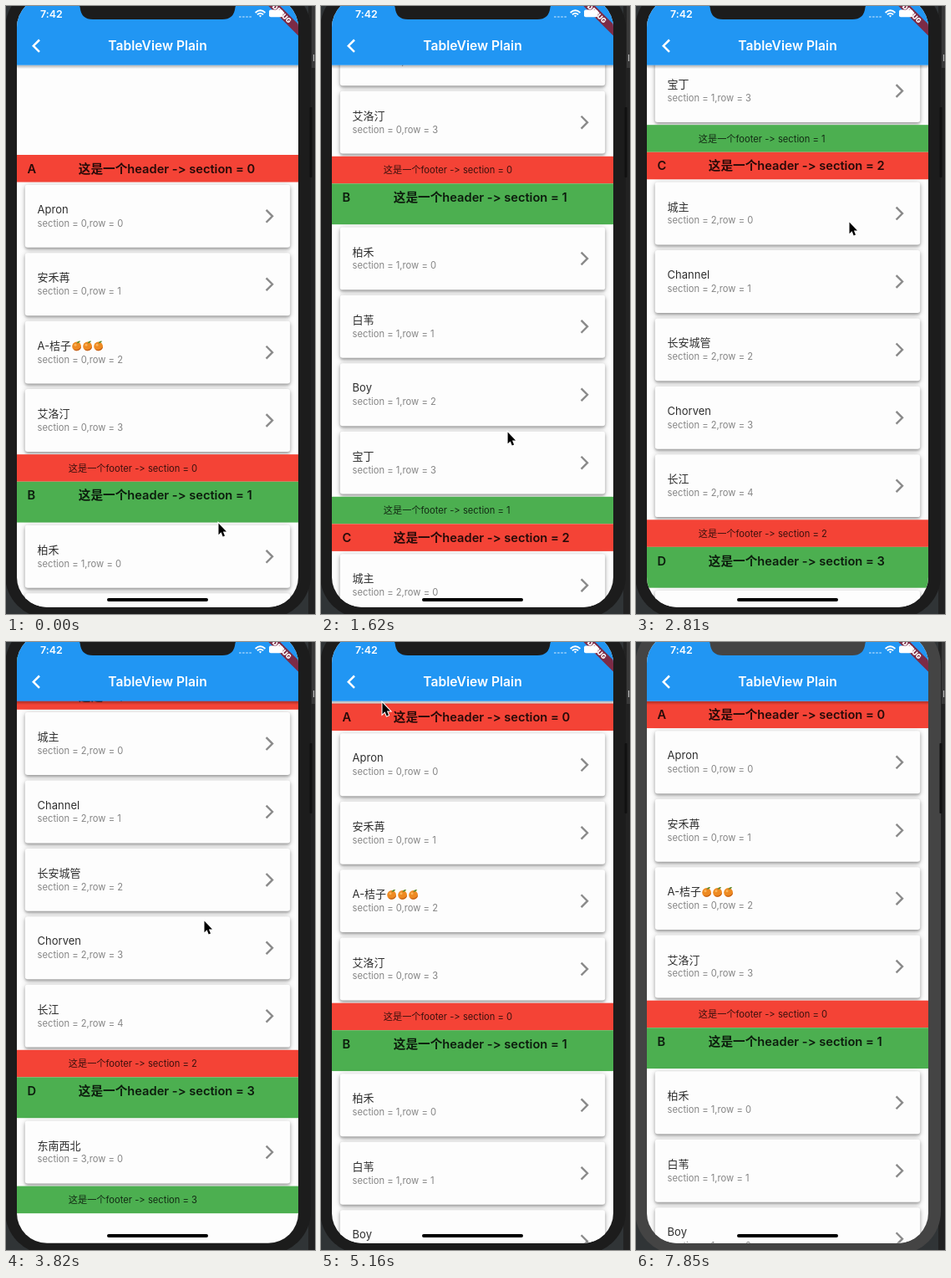
These frames come from a looping animation (370x727 px, 7.95 s). An HTML page:

```html
<!DOCTYPE html>
<html lang="zh">
<head>
<meta charset="utf-8">
<title>TableView Plain</title>
<style>
  html, body { margin: 0; width: 100%; height: 100%; overflow: hidden; background: #1a1a1a; }
  svg {
    display: block; width: 370px; height: 727px;
    font-family: Inter, "Noto Sans CJK SC", "Noto Sans CJK", sans-serif;
    font-variant-ligatures: none; font-feature-settings: "calt" 0;
  }
  text { white-space: pre; }
  .card { fill: #fdfdfd; filter: drop-shadow(0 2px 1.5px rgba(0,0,0,.26)) drop-shadow(0 1px 3px rgba(0,0,0,.24)); }
  .name { font-size: 13px; fill: #2e2e2e; }
  .sub { font-size: 11.2px; fill: #858585; }
  .head { font-size: 14.65px; font-weight: 600; fill: rgba(0,0,0,.84); }
  .foot { font-size: 11.2px; fill: rgba(0,0,0,.76); }
  .arrow { fill: none; stroke: #8a8a8a; stroke-width: 2.4; }
  .bar { fill: #fff; font-weight: 600; }
</style>
</head>
<body>
<svg viewBox="0 0 370 727">
  <defs>
    <clipPath id="screen"><rect x="13" y="-10.5" width="337" height="729.3" rx="36"/></clipPath>
    <linearGradient id="shade" x2="0" y2="1">
      <stop stop-opacity=".3"/><stop offset="1" stop-opacity="0"/>
    </linearGradient>
    <g id="orange">
      <circle r="5.4" cy=".6" fill="#ee8a22"/>
      <path d="M-4 4A5.4 5.4 0 0 0 5.4 .6A7 7 0 0 1-4 4" fill="#c05c18"/>
      <circle cx="-1.6" cy="-1" r="1.5" fill="#f9b45a"/>
      <path d="M0-3.2Q1-6.6 4.6-5.6Q3.4-2.8 0-3.2" fill="#5f8a2c"/>
    </g>
  </defs>

  <rect width="370" height="727" fill="#303436"/>
  <rect x="362" width="8" height="727" fill="#222"/>
  <rect x="366" width="4" height="74" fill="#393939"/>
  <path d="M368.5 58V66" stroke="#bbb" stroke-width="1.2"/>
  <rect id="bezel" x="-1" y="-24" width="366" height="756" rx="51"/>
  <rect x="363.5" y="121" width="3" height="84" rx="1" fill="#111"/>

  <g clip-path="url(#screen)">
    <rect x="13" y="-11" width="337" height="731" fill="#fdfdfd"/>
    <g id="list"></g>
    <rect x="13" y="70.7" width="337" height="4.5" fill="url(#shade)"/>
    <rect x="13" y="-11" width="337" height="81.7" fill="#2196f3"/>
    <path d="M40 40.5L32.8 47.7L40 54.9" fill="none" stroke="#fff" stroke-width="2.5"/>
    <text class="bar" x="181.5" y="53.4" font-size="15.6" text-anchor="middle">TableView Plain</text>
    <text class="bar" x="41" y="14" font-size="12.4">7:42</text>
    <path d="M279 13H294" stroke="#fff" stroke-opacity=".4" stroke-width="2" stroke-dasharray="2.6 1.5"/>
    <path d="M298.6 8Q304.5 2.7 310.4 8M300.9 10.3Q304.5 7 308.1 10.3" fill="none" stroke="#fff" stroke-width="1.9"/>
    <path d="M302.8 11.6Q304.5 10.2 306.2 11.6L304.5 13.6Z" fill="#fff"/>
    <rect transform="translate(350 -10.5) rotate(45)" x="-33" y="22.8" width="66" height="9.8" fill="#7c2b46"/>
    <rect x="315" y="4.6" width="16.5" height="8.6" rx="2" fill="#fff"/>
    <path d="M332.8 7.2V10.6" stroke="#fff" stroke-opacity=".6"/>
    <text transform="translate(350 -10.5) rotate(45)" y="30.7" font-size="8.1" font-weight="900" fill="#fff" text-anchor="middle">DEBUG</text>
    <rect x="121" y="708" width="121" height="4" rx="2"/>
  </g>
  <path id="notch" d="M87 -1Q88.5 0 88.7 2Q90 16 104 16H259Q273 16 274.4 2Q274.6 0 276 -1Z"/>
  <path id="cursor" d="M.5 .5V14.2L3.6 11.3L5.7 16.4L8 15.4L5.9 10.5H10Z" stroke="#fff" stroke-width="2" paint-order="stroke"/>
</svg>
<script>
const $ = id => document.getElementById(id);
const NS = 'http://www.w3.org/2000/svg';
const PT = 337 / 414;
const LOOP = 7950, STEP = 147.3;
const COLORS = ['#f44336', '#4caf50'];

const sections = [
  ['Apron', '安禾苒', 'A-桔子', '艾洛汀'],
  ['柏禾', '白苇', 'Boy', '宝丁'],
  ['城主', 'Channel', '长安城管', 'Chorven', '长江'],
  ['东南西北']
];

function add(tag, attrs, content) {
  const el = document.createElementNS(NS, tag);
  for (const key in attrs) el.setAttribute(key, attrs[key]);
  if (content) el.textContent = content;
  $('list').appendChild(el);
}

const label = (x, y, cls, content) => add('text', { x, y, class: cls }, content);
const band = (y, height, fill) => add('rect', { x: 13, y, width: 337, height, fill });

function addRow(y, name, s, r) {
  add('rect', { x: 22.8, y: y + 3.3, width: 317.4, height: 74.9, rx: 3.2, class: 'card' });
  label(37.6, y + 37.4, 'name', name);
  label(37.6, y + 53.2, 'sub', `section = ${s},row = ${r}`);
  add('path', { d: `M311.6 ${y + 33.4}l7.4 7.4l-7.4 7.4`, class: 'arrow' });
  if (!name.endsWith('桔子')) return;
  for (let i = 0; i < 3; i++) add('use', { href: '#orange', x: 84.6 + 13 * i, y: y + 33 });
}

function buildList() {
  let y = 0;
  sections.forEach((names, s) => {
    const color = COLORS[s % 2];
    const headHeight = (s % 2 ? 60 : 40) * PT;
    band(y, headHeight, color);
    label(25.5, y + 21.7, 'head', 'ABCD'[s]);
    label(86.8, y + 21.7, 'head', `这是一个header -> section = ${s}`);
    y += headHeight;
    names.forEach((name, r) => {
      addRow(y, name, s, r);
      y += 100 * PT;
    });
    band(y, 40 * PT, color);
    label(74.8, y + 20.4, 'foot', `这是一个footer -> section = ${s}`);
    y += 40 * PT;
  });
}

// Turning points: [step, list top] and [step, x, y]
const scroll = [
  [0, 178], [4, 70.5], [7, 30], [14, -373.5], [19, -623], [26, -749.5], [33, 76.5], [37, 70.5]
];
const pointer = [
  [0, 254, 618], [7, 227, 540], [14, 222, 477], [19, 255, 258], [26, 237, 333],
  [35, 73, 72], [39, 28, 50], [47, 28, 50], [49, 313, 718]
];

// Monotone cubic through the turning points
function track(keys, k, col = 1) {
  const last = keys.length - 1;
  if (k >= keys[last][0]) return keys[last][col];
  const i = keys.findIndex((key, n) => n < last && k < keys[n + 1][0]);
  const slope = n => (keys[n + 1][col] - keys[n][col]) / (keys[n + 1][0] - keys[n][0]);
  const tangent = n => {
    if (n === 0 || n === last) return 0;
    const a = slope(n - 1), b = slope(n);
    return a * b > 0 ? 2 * a * b / (a + b) : 0;
  };
  const span = keys[i + 1][0] - keys[i][0];
  const u = (k - keys[i][0]) / span, v = 1 - u;
  return v * v * (1 + 2 * u) * keys[i][col] + u * u * (3 - 2 * u) * keys[i + 1][col]
    + span * u * v * (v * tangent(i) - u * tangent(i + 1));
}

function move(id, x, y) {
  $(id).setAttribute('transform', `translate(${x.toFixed(1)} ${y.toFixed(1)})`);
}

function draw(t) {
  // The picture advances in coarse steps
  const k = Math.floor((t + 12) / STEP);
  move('list', 0, track(scroll, k));
  move('cursor', track(pointer, k), track(pointer, k, 2));
  $('cursor').setAttribute('visibility', t < 7530 ? 'visible' : 'hidden');
  const frame = t < 7850 ? '#1c1c1c' : '#444';
  $('bezel').setAttribute('fill', frame);
  $('notch').setAttribute('fill', frame);
}

buildList();
const start = performance.now();
function tick() {
  draw((performance.now() - start) % LOOP);
  requestAnimationFrame(tick);
}
tick();
</script>
</body>
</html>
```
